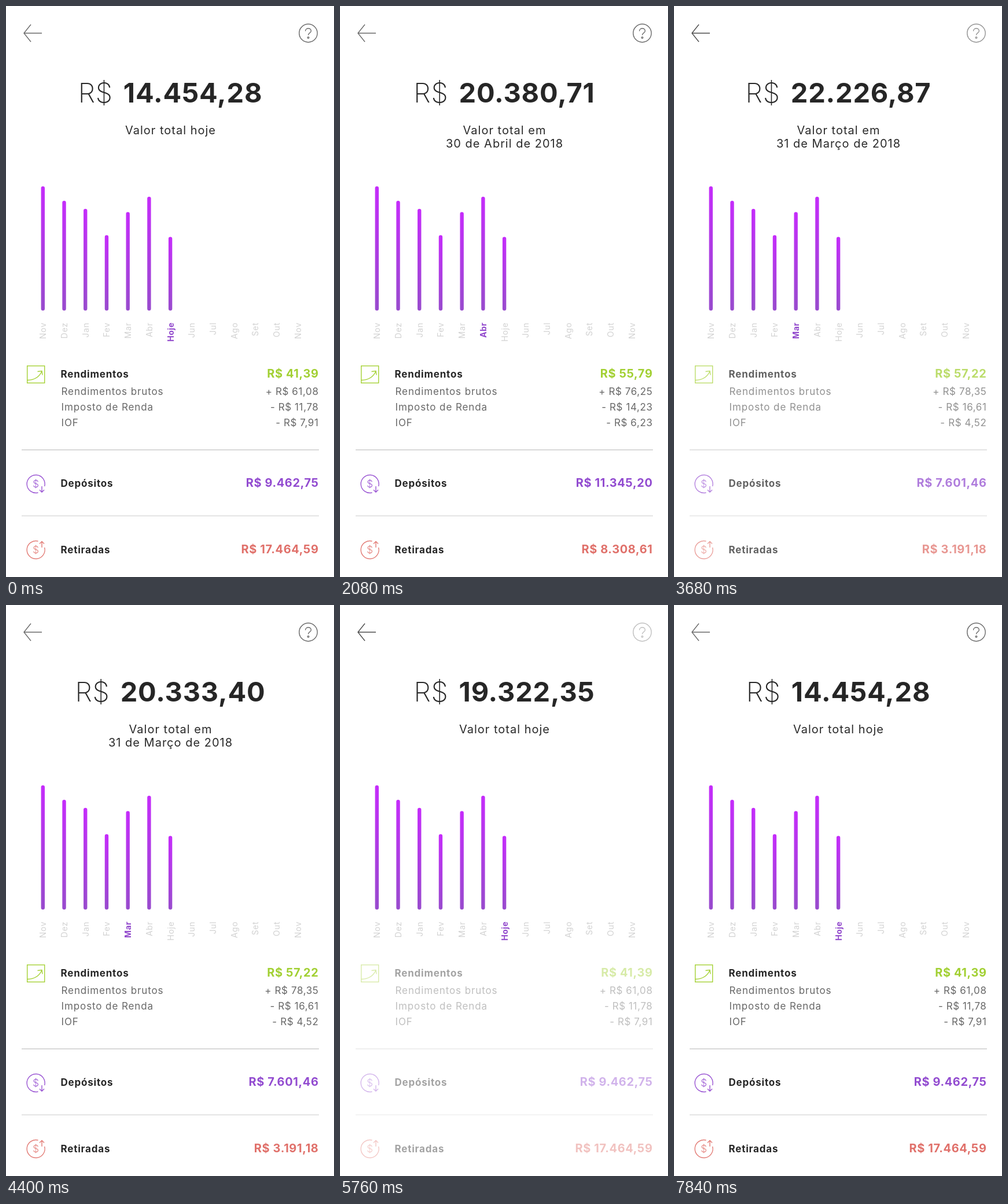
Recreate the animation shown at these times as an HTML page. Size 567x988 px, loop 7.92 s.

```html
<!DOCTYPE html>
<html lang="pt-BR">
<head>
<meta charset="utf-8">
<style>
  html, body { margin: 0; width: 100%; height: 100%; overflow: hidden; background: #fff; }
  svg { display: block; width: 100vw; height: 100vh; }
  text { font-family: Inter, Lato, sans-serif; white-space: pre; }
  .total { font-size: 47px; letter-spacing: .8px; fill: #262626; }
  .caption { font-size: 20px; letter-spacing: 1px; fill: #2a2a2a; }
  .month { font-size: 14px; letter-spacing: .7px; fill: #d2d2d2; }
  .month.on { font-weight: 700; letter-spacing: .5px; fill: #9148cc; }
  .head { font-size: 17px; font-weight: 700; letter-spacing: .8px; fill: #262626; }
  .item { font-size: 17px; letter-spacing: .9px; fill: #686868; }
  .item.num { letter-spacing: .6px; }
  .sum { font-size: 20px; font-weight: 700; letter-spacing: .6px; }
  .icon { fill: none; stroke-width: 1.4; }
</style>
</head>
<body>
<svg id="stage" viewBox="0 0 567 988" xmlns="http://www.w3.org/2000/svg">
  <defs>
    <linearGradient id="bar" x1="0" y1="0" x2="0" y2="1">
      <stop offset="0" stop-color="#c52cfb"/>
      <stop offset="1" stop-color="#984bcd"/>
    </linearGradient>
  </defs>
  <path id="back" class="icon" d="M62 47H31M43 32L31 47L43 62"/>
  <text class="total" x="284" y="167" text-anchor="middle"><tspan font-weight="200">R$</tspan><tspan id="total" font-weight="700" dx="18"></tspan></text>
  <g id="caption" class="caption" text-anchor="middle">
    <text x="284.5" y="222"></text>
    <text x="284.5" y="245"></text>
  </g>
  <g id="chart"></g>
  <g id="details">
    <g class="icon" stroke="#6a6a6a">
      <circle cx="522.5" cy="47" r="15.7"/>
      <path d="M517.6 43.5C517.6 37.2 527.4 37.2 527.4 43.2C527.4 47 522.5 46.3 522.5 50.5"/>
      <circle cx="522.5" cy="54.7" r="1.3"/>
    </g>
    <g class="icon" stroke="#a5d136">
      <rect x="36.7" y="622.7" width="30" height="29.6"/>
      <path d="M37 647.5C50 647 58 641 62 632M54.5 632.5L62 631.5L63 638.5"/>
    </g>
    <path d="M27 768H541" stroke="#ccc" stroke-width="1.6"/>
    <path d="M27 882.3H541" stroke="#dcdcdc" stroke-width="1.4"/>
    <g class="icon" stroke="#9a55d3">
      <path d="M66.6 831A15.5 15.5 0 1 0 55.5 842M62 831V841M58 837.3L62 841.3L66 837.3"/>
    </g>
    <g class="icon" stroke="#e37c76">
      <path d="M66.6 937A15.5 15.5 0 1 1 55.5 926M62 937V927M58 930.5L62 926.5L66 930.5"/>
    </g>
    <text x="51.5" y="833" font-size="17" font-weight="300" text-anchor="middle" fill="#9a55d3">$</text>
    <text x="51.5" y="947" font-size="17" font-weight="300" text-anchor="middle" fill="#e37c76">$</text>
  </g>
</svg>
<script>
const LOOP = 7920, FIRST = 790, STEP = 2400;
const FADE = 280, COUNT_DELAY = 260, COUNT = 1540;

const byId = id => document.getElementById(id);
const clamp = v => Math.max(0, Math.min(1, v));
const smooth = v => v * v * (3 - 2 * v);

function add(parent, tag, attrs, content = "") {
  const node = document.createElementNS("http://www.w3.org/2000/svg", tag);
  for (const key in attrs) node.setAttribute(key, attrs[key]);
  node.textContent = content;
  parent.append(node);
  return node;
}

function money(value) {
  const [whole, cents] = value.toFixed(2).split(".");
  return whole.replace(/\B(?=(\d{3})+$)/g, ".") + "," + cents;
}

const today = {
  month: 6, total: 14454.28, caption: ["Valor total hoje", ""],
  values: ["R$ 41,39", "+ R$ 61,08", "- R$ 11,78", "- R$ 7,91", "R$ 9.462,75", "R$ 17.464,59"]
};
const april = {
  month: 5, total: 22414.73, caption: ["Valor total em", "30 de Abril de 2018"],
  values: ["R$ 55,79", "+ R$ 76,25", "- R$ 14,23", "- R$ 6,23", "R$ 11.345,20", "R$ 8.308,61"]
};
const march = {
  month: 4, total: 19322.35, caption: ["Valor total em", "31 de Março de 2018"],
  values: ["R$ 57,22", "+ R$ 78,35", "- R$ 16,61", "- R$ 4,52", "R$ 7.601,46", "R$ 3.191,18"]
};
const states = [today, april, march, today];

const barTops = [312, 337, 351, 396.5, 356.5, 330, 399.5];
const columnX = i => 63.8 + i * 36.72;
barTops.forEach((y, i) => add(byId("chart"), "rect", {
  x: columnX(i) - 3.2, y, width: 6.4, height: 527 - y, rx: 3.2, fill: "url(#bar)"
}));
const months = "Nov Dez Jan Fev Mar Abr Hoje Jun Jul Ago Set Out Nov".split(" ").map((name, i) =>
  add(byId("chart"), "text", {
    "text-anchor": "end", transform: `translate(${columnX(i) + 5.4} 547.5) rotate(-90)`
  }, name));

// label, baseline, colour of the amount (only on main rows)
const rows = [
  ["Rendimentos", 642.5, "#a2d033"],
  ["Rendimentos brutos", 672.5],
  ["Imposto de Renda", 699.5],
  ["IOF", 726.5],
  ["Depósitos", 832, "#924bd0"],
  ["Retiradas", 946.5, "#e0706a"]
];
const amounts = rows.map(([label, y, color]) => {
  add(byId("details"), "text", { x: color ? 94.5 : 95.5, y, class: color ? "head" : "item" }, label);
  return add(byId("details"), "text", {
    x: 540.5, y, "text-anchor": "end", class: color ? "sum" : "item num", ...(color && { fill: color })
  });
});

let shown = -1;
function show(index) {
  if (index === shown) return;
  shown = index;
  const state = states[index];
  months.forEach((node, i) => node.setAttribute("class", i === state.month ? "month on" : "month"));
  amounts.forEach((node, i) => node.textContent = state.values[i]);
  [...byId("caption").children].forEach((node, i) => node.textContent = state.caption[i]);
}

function draw(time) {
  const index = Math.max(0, Math.min(3, Math.floor((time - FIRST) / STEP) + 1));
  show(index);
  let total = today.total, opacity = 1;
  if (index > 0) {
    const age = time - FIRST - (index - 1) * STEP;
    const from = states[index - 1].total;
    total = from + (states[index].total - from) * smooth(clamp((age - COUNT_DELAY) / COUNT));
    // details dim to nothing, then return
    opacity = clamp(Math.abs(age - 8 - FADE) / FADE);
    if (age < 8) opacity = 1;
  }
  byId("total").textContent = money(total);
  byId("details").setAttribute("opacity", opacity);
  byId("back").setAttribute("stroke", opacity < 1 ? "#4c4c4c" : "#6a6a6a");
}

const start = performance.now();
function tick() {
  draw((performance.now() - start) % LOOP);
  requestAnimationFrame(tick);
}
tick();
</script>
</body>
</html>
```
